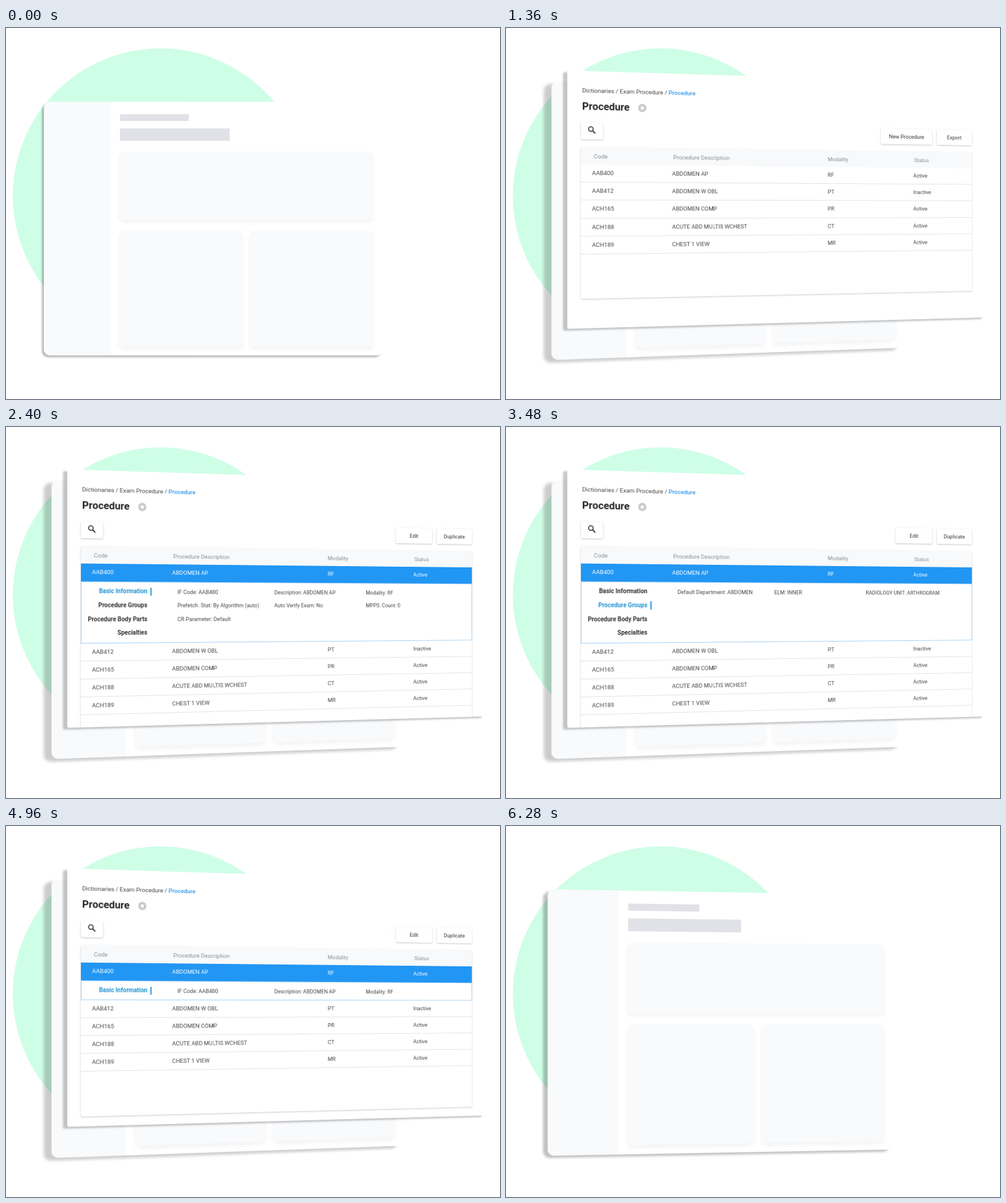
An HTML page that plays this animation: 798x600 px, repeating every 6320 ms.

```html
<!DOCTYPE html>
<html lang="en">
<head>
<meta charset="utf-8">
<title>Procedure dictionary</title>
<style>
  html, body { margin: 0; width: 100%; height: 100%; overflow: hidden; background: #fff; }
  #stage { position: relative; width: 798px; height: 600px; overflow: hidden; font: 9.8px/14px Roboto, Arial, sans-serif; color: #444; }
  #stage * { box-sizing: border-box; }
  #stage div, #stage span, #stage svg { position: absolute; white-space: nowrap; }
  #disc { left: 10.5px; top: 32.5px; width: 477px; height: 477px; border-radius: 50%; background: #cffee7; }
  .panel { left: 0; top: 0; transform-origin: 0 0; background: #fff; }

  #shell { width: 548px; height: 410px; border-radius: 10px; }
  #side { width: 108px; height: 410px; background: #f8fafc; border-radius: 10px 0 0 10px; }
  .bar { left: 122.5px; background: #e1e1e8; }
  .card { background: #f9fafc; border-radius: 10px; box-shadow: 0 5px 6px rgba(0,0,0,.045); }

  #page { width: 744px; height: 418px; border-radius: 3px; box-shadow: -7px 3px 3px rgba(0,0,0,.22); }
  #view { inset: 0; overflow: hidden; border-radius: 3px; }
  #crumbs { left: 24px; top: 25.3px; font-size: 9.95px; }
  #crumbs b { font-weight: 500; color: #2f96e8; }
  #title { left: 24px; top: 46.2px; font: 700 16.8px/22px Roboto, Arial, sans-serif; color: #262626; }
  .btn { top: 83.5px; height: 27px; line-height: 27px; text-align: center; color: #333; background: #fff; border-radius: 2px; box-shadow: 0 1px 3px rgba(0,0,0,.24); }

  #table { left: 22px; top: 124.3px; width: 696px; background: #fff; border-radius: 2px; box-shadow: 0 1px 3px rgba(0,0,0,.22); }
  #stage #table > div { position: relative; width: 100%; }
  #head { height: 28px; line-height: 30px; color: #8a8d92; background: #f8f9fb; }
  .row { height: 29.1px; line-height: 28.5px; border-bottom: 1px solid #e3e3e5; }
  .row.first { color: color-mix(in srgb, #fff calc(var(--sel) * 100%), #444); }
  .fill { inset: 0 0 -1px; background: #2196f3; opacity: var(--sel); }
  #detail { overflow: hidden; font-size: 9.3px; box-shadow: inset 0 0 0 1px #a3d0f8; }
  .tab { right: 586.6px; font-size: 10px; font-weight: 700; color: color-mix(in srgb, #2196d8 calc(var(--on) * 100%), #333); }
  #mark { left: 113.7px; width: 3px; height: 13.5px; background: #62aef0; }
</style>
</head>
<body>
<div id="stage">
  <div id="disc"></div>
  <div id="shell" class="panel">
    <div id="side"></div>
    <div class="bar" style="top:19.5px;width:111.5px;height:11.5px"></div>
    <div class="bar" style="top:42.5px;width:177px;height:20px"></div>
    <div class="card" style="left:121px;top:79.5px;width:412px;height:111px"></div>
    <div class="card" style="left:121px;top:207.5px;width:201px;height:188px"></div>
    <div class="card" style="left:331.5px;top:207.5px;width:201px;height:188px"></div>
  </div>
  <div id="page" class="panel">
    <div id="view">
      <span id="crumbs">Dictionaries / Exam Procedure / <b>Procedure</b></span>
      <span id="title">Procedure</span>
      <svg style="left:115.5px;top:51px" width="14" height="14" viewBox="-7 -7 14 14">
        <circle r="6.8" fill="#c6c6c8"/>
        <path d="M0-4.6 1.2-1.5 4.4-1.4 1.9.6 2.8 3.8 0 2-2.8 3.8-1.9.6-4.4-1.4-1.2-1.5Z" fill="#fff"/>
      </svg>
      <div class="btn" style="left:22px;width:35.5px"></div>
      <svg style="left:33px;top:89.4px" width="14" height="14" fill="none" stroke="#333">
        <circle cx="5.2" cy="5.2" r="3.7" stroke-width="1.6"/>
        <path d="M8 8 12.4 12.4" stroke-width="2"/>
      </svg>
      <div id="idle">
        <div class="btn" style="left:544px;width:97px">New Procedure</div>
        <div class="btn" style="left:649.5px;width:68.5px">Export</div>
      </div>
      <div id="picked">
        <div class="btn" style="left:572px;width:69px">Edit</div>
        <div class="btn" style="left:649.5px;width:68.5px">Duplicate</div>
      </div>
      <div id="table"></div>
    </div>
  </div>
</div>
<script>
const LOOP = 6320, TAB_TOP = 8.9, TAB_STEP = 22.7, DETAIL = 100.5;
const $ = id => document.getElementById(id);

const text = (s, x, y = 0) => `<span style="left:${x}px;top:${y}px">${s}</span>`;
const cells = (line, xs) => line.split('|').map((s, i) => text(s, xs[i])).join('');
const COLS = [18, 151, 424, 583];
const rows = [
  'AAB400|ABDOMEN AP|RF|Active',
  'AAB412|ABDOMEN W OBL|PT|Inactive',
  'ACH165|ABDOMEN COMP|PR|Active',
  'ACH188|ACUTE ABD MULTIS WCHEST|CT|Active',
  'ACH189|CHEST 1 VIEW|MR|Active'
].map((line, i) => `<div class="row${i ? '' : ' first'}">${i ? '' : '<div class="fill"></div>'}${cells(line, COLS)}</div>`);

const tabY = i => TAB_TOP + TAB_STEP * i;
const tabs = ['Basic Information', 'Procedure Groups', 'Procedure Body Parts', 'Specialties']
  .map((s, i) => `<span class="tab" style="top:${tabY(i)}px">${s}</span>`).join('');
const fields = (id, lines) => `<div id="${id}">` + lines.map((line, r) =>
  line.split('|').map((s, c) => text(s, [160, 328, 494][c], tabY(r) + .4)).join('')).join('') + '</div>';

$('table').innerHTML =
  `<div id="head">${cells('Code|Procedure Description|Modality|Status', [21, 153, 424, 585])}</div>` +
  rows[0] +
  `<div id="detail">${tabs}<div id="mark"></div>` +
  fields('basic', [
    'IF Code: AAB400|Description: ABDOMEN AP|Modality: RF',
    'Prefetch. Stat: By Algorithm (auto)|Auto Verify Exam: No|MPPS. Count: 0',
    'CR Parameter: Default']) +
  fields('groups', ['Default Department: ABDOMEN|ELM: INNER|RADIOLOGY UNIT: ARTHROGRAM']) +
  '</div>' + rows.slice(1).join('');
const tabEls = document.querySelectorAll('.tab');

const ramp = (t, start, span) => Math.min(1, Math.max(0, (t - start) / span));
const easeOut = (t, start, span) => 1 - (1 - ramp(t, start, span)) ** 3;
const mix = (a, b, p) => a + (b - a) * p;

// Pose: left x, right x, then top and bottom y on the left, top and bottom y on the right.
const SHELL = [[61, 609, 119.5, 529.5, 119.5, 529.5], [73.5, 643, 86, 537, 104, 517]];
const PAGE = [[143, 672, 160, 486, 175, 473], [99, 774, 68.5, 486.5, 89.7, 468]];

// Projects a flat w by h box onto an upright trapezoid.
function project(el, w, h, [from, to], p) {
  const [x0, x1, a, b, c, d] = from.map((v, i) => mix(v, to[i], p));
  const k = (b - a) / (d - c);
  el.style.transform = `matrix3d(${[
    (x1 * k - x0) / w, (c * k - a) / w, 0, (k - 1) / w,
    0, (b - a) / h, 0, 0,
    0, 0, 1, 0,
    x0, a, 0, 1].map(v => v.toFixed(8)).join()})`;
}

function draw(t) {
  const tilt = easeOut(t, 0, 600) - easeOut(t, 6160, 600);
  const show = easeOut(t, 600, 380) - easeOut(t, 5520, 600);
  const open = easeOut(t, 1400, 500) - ramp(t, 4680, 410);
  const sel = ramp(t, 1400, 160) - ramp(t, 4960, 120);
  const group = ramp(t, 2680, 320) - ramp(t, 4680, 200);

  project($('shell'), 548, 410, SHELL, tilt);
  $('shell').style.boxShadow =
    `${mix(-3, -11, tilt)}px ${mix(3, 4, tilt)}px ${mix(3, 4, tilt)}px rgba(0,0,0,${mix(.28, .2, tilt)})`;

  project($('page'), 744, 418, PAGE, show);
  $('page').style.opacity = show;

  $('table').style.height = 246 + DETAIL * open + 'px';
  $('detail').style.height = DETAIL * open + 'px';
  $('table').style.setProperty('--sel', sel);
  $('idle').style.opacity = 1 - sel;
  $('picked').style.opacity = sel;

  [1 - group, group, 0, 0].forEach((on, i) => tabEls[i].style.setProperty('--on', on));
  $('mark').style.top = tabY(group) + .5 + 'px';
  $('basic').style.opacity = 1 - group;
  $('groups').style.opacity = group;
}

const start = performance.now();
function tick() {
  draw((performance.now() - start) % LOOP);
  requestAnimationFrame(tick);
}
tick();
</script>
</body>
</html>
```
